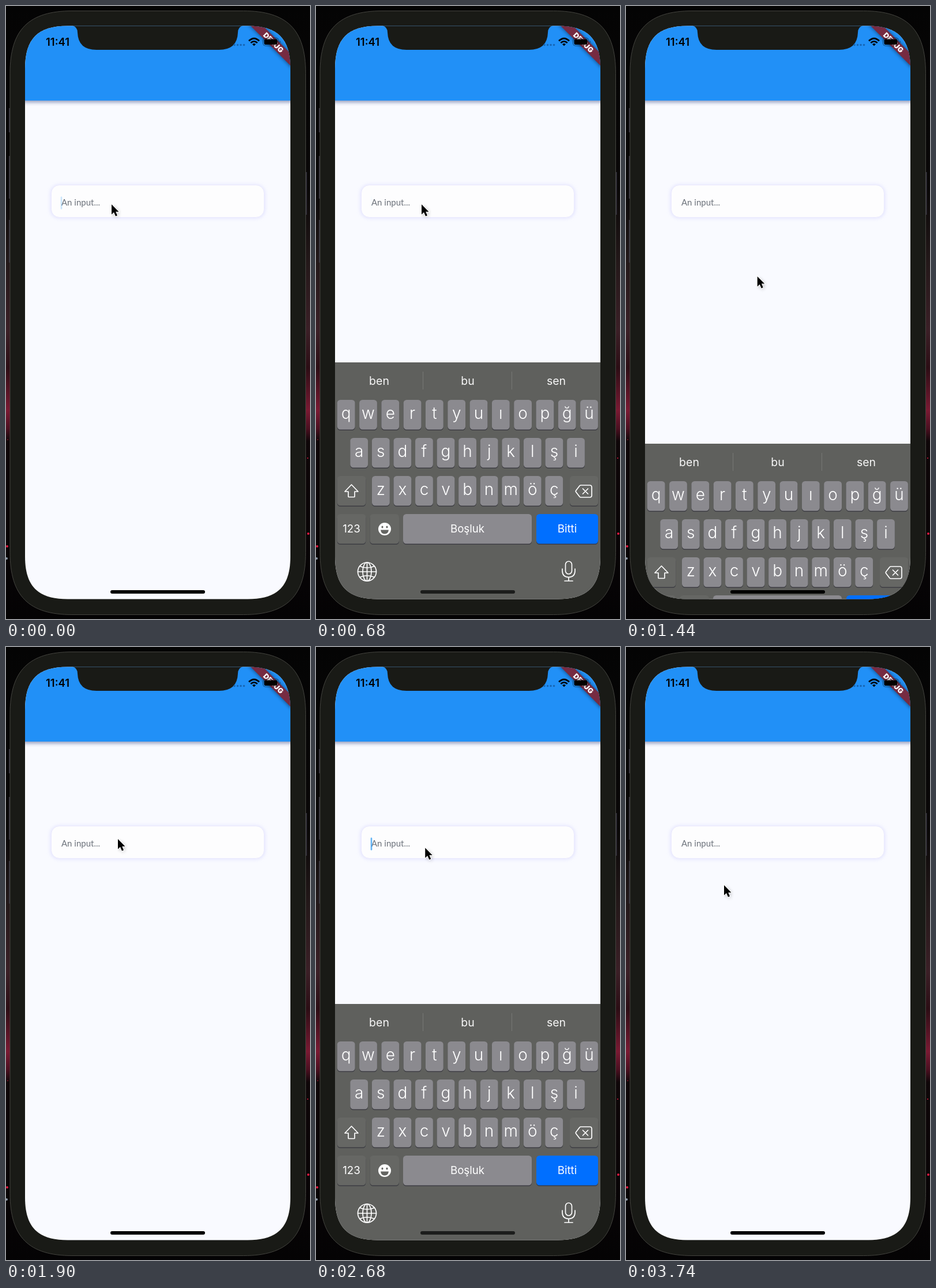
These frames come from a looping animation (527x1063 px, 3760 ms). An HTML page:

```html
<!DOCTYPE html>
<html lang="tr">
<head>
<meta charset="utf-8">
<title>Keyboard toggle</title>
<style>
html, body { margin: 0; width: 100%; height: 100%; overflow: hidden; background: #050505; }
svg { display: block; width: 100%; height: 100%; }
text { font-family: Inter, Roboto, "Liberation Sans", sans-serif; fill: #fff; }
.letter { font-size: 28px; font-weight: 300; text-anchor: middle; }
.label { font-size: 18.7px; text-anchor: middle; }
.line { fill: none; stroke: #fff; stroke-width: 1.7; stroke-linecap: round; stroke-linejoin: round; }
</style>
</head>
<body>
<svg viewBox="0 0 527 1063">
  <defs>
    <linearGradient id="city" x2="0" y2="1">
      <stop offset="0" stop-color="#040404"/>
      <stop offset=".3" stop-color="#0a0808"/>
      <stop offset=".42" stop-color="#24191a"/>
      <stop offset=".53" stop-color="#3b2027"/>
      <stop offset=".59" stop-color="#2c0e15"/>
      <stop offset=".66" stop-color="#7a1a33"/>
      <stop offset=".69" stop-color="#4a1020"/>
      <stop offset=".71" stop-color="#0f0709"/>
      <stop offset="1" stop-color="#040304"/>
    </linearGradient>
    <clipPath id="screen"><path id="screenShape"/></clipPath>
    <filter id="soft" x="-20%" y="-60%" width="140%" height="220%"><feGaussianBlur stdDeviation="3"/></filter>
  </defs>

  <rect width="527" height="1063" fill="url(#city)"/>
  <g fill="#e01840">
    <circle cx="524" cy="915" r="2"/><circle cx="2" cy="937" r="2"/>
    <circle cx="3" cy="752" r="1" opacity=".5"/><circle cx="523" cy="784" r="1.2" opacity=".7"/>
    <circle cx="1" cy="958" r="2" fill="#8a95a5"/>
  </g>
  <path d="M6 177V219M6 260V334M6 371V445M520.5 288V362" stroke="#373440" stroke-width="2"/>
  <path id="body" fill="#191a16" stroke="#44443f"/>

  <g clip-path="url(#screen)">
    <rect x="33" y="34" width="460" height="996" fill="#f9faff"/>
    <rect x="30" y="130" width="466" height="37" fill="#4b5a90" opacity=".6" filter="url(#soft)"/>
    <rect x="33" y="34" width="460" height="130" fill="#2190f7"/>

    <rect x="77" y="310" width="372" height="58" rx="15" fill="#dcdcff" opacity=".8" filter="url(#soft)"/>
    <rect x="78.5" y="310.5" width="369" height="56" rx="14" fill="#fdfdfe" stroke="#ebeafd"/>
    <text x="96" y="346" style="font:15px Lato,'Open Sans',sans-serif;fill:#6c727b">An input...</text>
    <rect id="caret" x="94.7" y="330.5" width="2.6" height="22" rx="1.2" fill="#2196f3"/>

    <g transform="translate(493 34) rotate(45)">
      <rect x="-55" y="34" width="110" height="15.5" opacity=".5" filter="url(#soft)"/>
      <rect x="-55" y="34" width="110" height="15" fill="#762b42"/>
      <text y="46" text-anchor="middle" font-size="12.5" font-weight="900">DEBUG</text>
    </g>

    <path d="M110 33Q124 34 124 46Q125 76 157 76H369Q401 76 402 46Q402 34 416 33Z" fill="#191a16"/>
    <text x="69" y="69" font-size="18.5" font-weight="600" style="fill:#000">11:41</text>
    <path d="M396 67.5H413" stroke="#1766b5" stroke-width="3.6" stroke-linecap="round" stroke-dasharray="0 5.5"/>
    <g fill="none" stroke="#000" stroke-width="2.8">
      <path d="M421 60.5Q430 52 439 60.5M424.3 64Q430 58.8 435.7 64"/>
      <path d="M427 66.2Q430 64 433 66.2L430 69.2Z" fill="#000" stroke="none"/>
    </g>
    <rect x="445.5" y="55.5" width="27" height="13.5" rx="4" fill="none" stroke="#000" opacity=".45"/>
    <rect x="447.5" y="57.5" width="23" height="9.5" rx="2.2"/>
    <path d="M474.5 60Q477 62 474.5 65Z" opacity=".5"/>

    <g id="keyboard">
      <rect x="33" width="460" height="500" fill="#5f605d"/>
      <path d="M185.5 16V47M339.5 16V47" stroke="#777875"/>
      <g id="keys"></g>
      <g class="line">
        <path d="M61.5 212L73 224H67V232.5Q67 233.5 66 233.5H57Q56 233.5 56 232.5V224H50Z"/>
        <path d="M459 213H474.5Q478 213 478 216.5V230.5Q478 234 474.5 234H459Q458 234 457 233L450.5 224.5Q450 223.5 450.5 222.5L457 214Q458 213 459 213ZM462.5 219L471.5 228M471.5 219L462.5 228"/>
        <circle cx="88.5" cy="363" r="16"/>
        <ellipse cx="88.5" cy="363" rx="7.5" ry="16"/>
        <path d="M88.5 347V379M72.5 363H104.5M76 353.5Q88.5 359 101 353.5M76 372.5Q88.5 367 101 372.5"/>
        <rect x="432.5" y="345" width="11" height="22" rx="5.5"/>
        <path d="M427 358V362Q427.500 372.500 438 372.500Q448.500 372.500 449 362V358M438 373V379M431 379H445"/>
      </g>
      <circle cx="119" cy="289" r="11" fill="#fff"/>
      <path d="M112 290.500H126Q125 297.500 119 297.500Q113 297.500 112 290.500Z" fill="#646562"/>
      <ellipse cx="115" cy="285.500" rx="1.500" ry="2" fill="#646562"/>
      <ellipse cx="123" cy="285.500" rx="1.500" ry="2" fill="#646562"/>
    </g>
    <rect id="home" x="181" y="1013" width="164" height="6" rx="3"/>
  </g>

  <g id="pointer">
    <circle id="touch" r="24.500" fill="#808080" fill-opacity=".36" stroke="#8f8f8f"/>
    <path d="M0 0V17.500L4 13.800L7 20.500L10 19.200L7.200 12.700H12.500Z" transform="translate(1.500 2)" fill="#000" opacity=".3" filter="url(#soft)"/>
    <path d="M0 0V17.500L4 13.800L7 20.500L10 19.200L7.200 12.700H12.500Z" stroke="#fff" stroke-width="2" paint-order="stroke"/>
  </g>
</svg>
<script>
const LOOP = 3760, TRAVEL = 412, TOP = 617;
const $ = id => document.getElementById(id);

// Rounded box with continuous corners of reach r
function squircle(x, y, w, h, r, k = 0.3) {
  const c = r * k, X = x + w, Y = y + h;
  return `M${x} ${y + r}C${x} ${y + c} ${x + c} ${y} ${x + r} ${y}H${X - r}` +
    `C${X - c} ${y} ${X} ${y + c} ${X} ${y + r}V${Y - r}` +
    `C${X} ${Y - c} ${X - c} ${Y} ${X - r} ${Y}H${x + r}` +
    `C${x + c} ${Y} ${x} ${Y - c} ${x} ${Y - r}Z`;
}
$('screenShape').setAttribute('d', squircle(33, 34.500, 460, 994, 74));
$('body').setAttribute('d', squircle(7, 8.500, 512.500, 1047, 108));

function key(x, y, w, fill, text = '', kind = 'label', base = 32) {
  return `<rect x="${x}" y="${y + 1.500}" width="${w}" height="51.500" rx="5.500" fill="#3c3c42"/>` +
    `<rect x="${x}" y="${y}" width="${w}" height="51.500" rx="5.500" fill="${fill}"/>` +
    `<text class="${kind}" x="${x + w / 2}" y="${y + base}">${text}</text>`;
}
const LIGHT = '#8b8a8f', DARK = '#666764';
const row = (letters, x, y, pitch) => [...letters].map((c, i) =>
  key(x + i * pitch, y, 30.800, LIGHT, c, 'letter', 33)).join('');
const words = ['ben', 'bu', 'sen'].map((word, i) =>
  `<text class="label" x="${109.500 + i * 153.500}" y="39" style="font-size:19.500px">` +
  [...word].map((c, n) => `<tspan data-n="${n}">${c}</tspan>`).join('') + '</text>').join('');
$('keys').innerHTML = words +
  row('qwertyuıopğü', 36.800, 65, 38.300) +
  row('asdfghjklşi', 59.300, 131, 37.580) +
  row('zxcvbnmöç', 97, 197, 37.540) +
  key(36.800, 197, 49.500, DARK) + key(440, 197, 49.200, DARK) +
  key(36.800, 263, 49.500, DARK, '123') + key(93.500, 263, 50.500, DARK) +
  key(151, 263, 223, LIGHT, 'Boşluk') + key(382, 263, 107, '#006fff', 'Bitti');
const letters = document.querySelectorAll('tspan');

const clamp = v => Math.min(1, Math.max(0, v));
const easeOut = v => 1 - (1 - clamp(v)) ** 2;
const smooth = v => v * v * (3 - 2 * v);

// Critically damped settling from 0 to 1
function spring(ms, speed) {
  const x = Math.max(0, ms) * speed / 1000;
  return 1 - (1 + x) * Math.exp(-x);
}

// Times of focus, keyboard rise, tap, blur and keyboard fall
const cycles = [
  { focus: -30, rise: 235, tap: 1270, blur: 1340, fall: 1380, end: 1420 },
  { focus: 2140, rise: 2264, tap: 3120, blur: 3170, fall: 3300, end: 3330 }
];
const path = [
  [0, 183, 344], [860, 183, 344], [1110, 228, 470], [1420, 228, 470], [1820, 194, 333],
  [2560, 194, 333], [3040, 164, 429], [3330, 164, 429], [3600, 170, 413], [LOOP, 170, 413]
];

function pointerAt(t) {
  const i = path.findIndex(p => p[0] > t), a = path[i - 1], b = path[i];
  const f = smooth((t - a[0]) / (b[0] - a[0]));
  return [a[1] + (b[1] - a[1]) * f, a[2] + (b[2] - a[2]) * f];
}

function caretAlpha(t, c) {
  if (t < c.focus || t >= c.blur) return 0;
  const p = (t - c.focus) % 1000;
  return p < 500 ? easeOut(p / 250) : 1 - easeOut((p - 500) / 250);
}

function draw(t) {
  const c = cycles[t < 2000 ? 0 : 1];
  const open = spring(t - c.rise, 18) * (1 - spring(t - c.fall, 20));
  const y = TOP + Math.round(TRAVEL * (1 - open));
  $('keyboard').setAttribute('transform', `translate(0 ${y})`);
  letters.forEach(l => l.setAttribute('fill-opacity',
    clamp((t - c.rise - 33 - l.dataset.n * 35) / 120) * 0.95));
  $('home').setAttribute('fill-opacity', 1 - 0.3 * clamp((open - 0.7) * 5));
  $('caret').setAttribute('opacity', caretAlpha(t, c));
  $('pointer').setAttribute('transform', `translate(${pointerAt(t)})`);
  const touching = (t >= c.tap && t < c.end) || (t >= 2040 && t < 2130);
  $('touch').setAttribute('visibility', touching ? 'visible' : 'hidden');
}

const start = performance.now();
function tick() {
  draw((performance.now() - start) % LOOP);
  requestAnimationFrame(tick);
}
tick();
</script>
</body>
</html>
```
